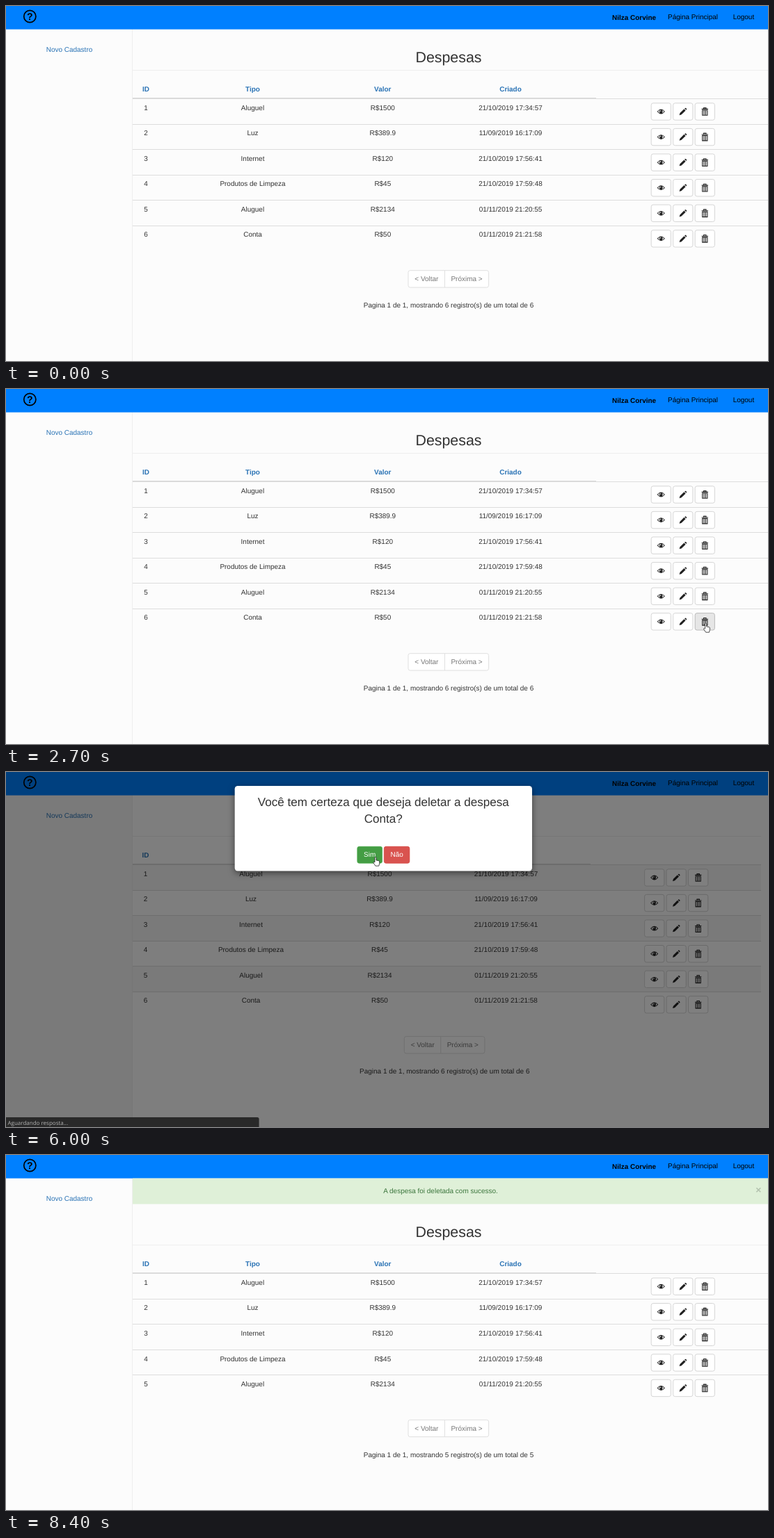
An HTML page for the animation above (8700 ms loop, 1095x511 px).

```html
<!DOCTYPE html>
<html lang="pt-BR">
<head>
<meta charset="utf-8">
<title>Despesas</title>
<style>
  html, body { margin: 0; width: 100%; height: 100%; overflow: hidden; background: #fcfcfc; }
  svg { display: block; }
  text { font: 9.98px "Liberation Sans", Arial, sans-serif; fill: #333; text-rendering: geometricPrecision; }
  .mid { text-anchor: middle; }
  .bold { font-weight: bold; }
  .link { fill: #2a73b5; }
  .nav { fill: #000; }
  .title { font-size: 21.4px; }
  .ask { font-size: 17.1px; }
  .white { fill: #fff; }
  .muted { fill: #777; }
  .ok { fill: #3c763d; }
  .close { font-size: 14px; font-weight: bold; fill: #b3c2ae; }
  .help { font-size: 14px; font-weight: bold; fill: #000; }
  .status { font: 8px "Open Sans", "Noto Sans", sans-serif; fill: #b4b4b4; }
  .btn { fill: #fff; stroke: #ccc; stroke-width: .8; }
  .btn.hover { fill: #e6e6e6; stroke: #adadad; }
  .btn.focus { fill: #e6e6e6; stroke: #3d8bf0; stroke-width: 1.6; }
</style>
</head>
<body>
<svg id="stage" width="1095" height="511" viewBox="0 0 1095 511"></svg>
<script>
const LOOP = 8700, STEP = 100, ROW = 36.57;

const expenses = [
  ["Aluguel", "R$1500", "21/10/2019 17:34:57"],
  ["Luz", "R$389.9", "11/09/2019 16:17:09"],
  ["Internet", "R$120", "21/10/2019 17:56:41"],
  ["Produtos de Limpeza", "R$45", "21/10/2019 17:59:48"],
  ["Aluguel", "R$2134", "01/11/2019 21:20:55"],
  ["Conta", "R$50", "01/11/2019 21:21:58"]
];

// Column centres, first button, header rule end, right edge and pager shift
const wide = { cols: [201, 354.5, 541.3, 725], buttons: 927.2, rule: 848, right: 1095, pager: 0 };
const narrow = { cols: [200.5, 352, 537, 718.5], buttons: 917.6, rule: 840, right: 1085, pager: -5.7 };

const text = (x, y, s, cls = "mid") => `<text x="${x}" y="${y}" class="${cls}">${s}</text>`;
const rect = (x, y, w, h, fill, extra = "") =>
  `<rect x="${x}" y="${y}" width="${w}" height="${h}" fill="${fill}" ${extra}/>`;
const group = (id, body) => `<g id="${id}">${body}</g>`;

const icons = [
  `<path d="M-5.6 0Q0-6.8 5.6 0Q0 6.8-5.6 0Z" fill="#222"/><path d="M-4.2 0Q-3.2-1.7-1.8-2.2Q-3 0-1.6 2.2Q-3.2 1.6-4.2 0ZM4.2 0Q3.2-1.7 1.8-2.2Q3 0 1.6 2.2Q3.2 1.6 4.2 0Z" fill="#fff"/><circle cx="-.7" cy="-1" r=".8" fill="#fff"/>`,
  `<path d="M-5.2 5.2L-4.3 2.1L1.6-3.7L3.8-1.5L-2.1 4.3ZM2.3-4.4L3.1-5.1Q3.8-5.5 4.4-4.9L5.1-4.2Q5.6-3.6 5.1-2.9L4.5-2.2Z" fill="#222"/>`,
  `<path d="M-4.6-3.6H4.6M-1.7-4V-5.4H1.7V-4M-3.6-2V5.3H3.6V-2ZM-1.2-1.8V5M1.2-1.8V5" fill="none" stroke="#222" stroke-width="1.1"/>`
];

const button = (x, y, icon) =>
  `<rect class="btn" x="${x}" y="${y - 12.2}" width="28.2" height="24.4" rx="2.8"/>` +
  `<g transform="translate(${x + 14.1} ${y})">${icon}</g>`;

function tableRow(cells, i, dy, lay, striped) {
  const top = 133 + dy + i * ROW, line = Math.round(top);
  return (striped && i % 2 === 0 ? rect(182, line, lay.right - 182, 37, "#f5f5f5") : "") +
    rect(182, line, lay.right - 182, 1, "#ddd") +
    [i + 1, ...cells].map((s, c) => text(lay.cols[c], top + 16.6, s)).join("") +
    icons.map((icon, b) => button(lay.buttons + b * 31.5, top + 19, icon)).join("");
}

function page(id, lay, count, { dy = 0, dim = false } = {}) {
  const mid = 636 + lay.pager, py = dy ? .6 : 0, x = 578 + lay.pager;
  const heads = ["ID", "Tipo", "Valor", "Criado"];
  return group(id,
    (dim ? rect(0, 33, 182, 478, "#f5f5f5") + rect(182, 33, 913, 478, "#fefefe") : "") +
    rect(181, 33, 1, 478, "#eee") +
    rect(0, 0, 1095, 33.6, "#0080ff") +
    `<circle cx="34.3" cy="15" r="8.6" fill="none" stroke="#000" stroke-width="1.7"/>` +
    text(34.3, 20, "?", "mid help") +
    text(871, 20, "Nilza Corvine", "nav bold") +
    text(951, 19, "Página Principal", "nav") +
    text(1044.7, 19, "Logout", "nav") +
    text(91, 65.6, "Novo Cadastro", "mid link") +
    (dy ? rect(182, 33.6, 913, 37, "#dff0d8") +
      text(624.5, 55.3, "A despesa foi deletada com sucesso.", "mid ok") +
      text(1081.3, 55, "×", "mid close") : "") +
    text(mid, 81 + dy, "Despesas", "mid title") +
    rect(182, 92 + dy, lay.right - 182, 1, "#eee") +
    heads.map((s, c) => text(lay.cols[c], 122.6 + dy, s, "mid bold link")).join("") +
    expenses.slice(0, count).map((e, i) => tableRow(e, i, dy, lay, dim)).join("") +
    rect(182, 132 + dy, lay.rule - 182, 1.4, "#d8d8d8") +
    rect(x, 380.7 + py, 115.6, 24.4, "#fff", `rx="2.8" stroke="#ddd" stroke-width=".9"`) +
    rect(x + 52, 381 + py, .9, 24, "#ddd") +
    text(x + 26.4, 396.4 + py, "&lt; Voltar", "mid muted") +
    text(x + 84, 396.4 + py, "Próxima &gt;", "mid muted") +
    text(mid, 434 + py, `Pagina 1 de 1, mostrando ${count} registro(s) de um total de ${count}`));
}

const dialog = group("dialog",
  rect(0, 0, 1095, 511, "#000", `opacity=".5"`) +
  rect(328.7, 20, 427.3, 122.4, "#fff", `rx="4.3" style="filter:drop-shadow(0 3.5px 5px rgba(0,0,0,.5))"`) +
  text(542.3, 48.5, "Você tem certeza que deseja deletar a despesa", "mid ask") +
  text(542.3, 72.5, "Conta?", "mid ask") +
  rect(504.8, 107.3, 35.8, 24, "#5cb85c", `id="yes" rx="2.8" stroke="#4cae4c" stroke-width=".7"`) +
  rect(543.3, 107.3, 36.6, 24, "#d9534f", `rx="2.8" stroke="#d43f3a" stroke-width=".7"`) +
  text(522.7, 122.4, "Sim", "mid white") +
  text(561.6, 122.4, "Não", "mid white"));

const status = group("status",
  `<path d="M0 511V497H361Q363.6 497 363.6 499.6V511Z" fill="#292929"/>` +
  text(2.5, 507.5, "Aguardando resposta...", "status"));

const cursor = group("cursor",
  `<path id="arrow" d="M.4.4V9L2.4 7.3L3.8 10.5L5.2 9.9L3.8 6.8H6.4Z" fill="#fff" stroke="#222" stroke-width=".8"/>` +
  `<path id="hand" transform="translate(-3.4 0)" d="M2.6 7.8V1.4a1 1 0 0 1 2 0V5l3.6.7q1.1.3 1.1 1.4v2.5L8.4 13.2H3.5L.5 8.6q-.1-1.3 1-1z" fill="#fff" stroke="#222" stroke-width=".8"/>`);

const $ = id => document.getElementById(id);
$("stage").innerHTML =
  page("list", wide, 6) +
  page("dimmed", narrow, 6, { dim: true }) +
  page("done", wide, 5, { dy: 37.2 }) +
  dialog + status + cursor;

const lastButton = id => [...document.querySelectorAll(`#${id} .btn`)].pop();
const trash = lastButton("list"), focused = lastButton("dimmed");

// Start time, number of steps, destination
const moves = [
  [200, 1, 32, 0], [300, 3, 738, 415], [600, 2, 387, 157],
  [900, 3, 750.5, 263], [1400, 4, 949, 366], [1900, 6, 1005.5, 340],
  [2600, 2, 1005.5, 337], [4300, 1, 963, 312], [4500, 2, 594, 163],
  [4800, 5, 530.8, 122], [7500, 4, 210, 58], [8000, 2, 674, 280], [8200, 2, 80, 0]
];

function cursorAt(t) {
  let x = 0, y = 0;
  for (const [start, steps, toX, toY] of moves) {
    if (t < start) break;
    const p = Math.min(1, ((t - start) / STEP + 1) / steps);
    x += (toX - x) * p;
    y += (toY - y) * p;
  }
  return [x, y];
}

const within = (t, from, to) => t >= from && t < to;
const show = (id, on) => { $(id).style.display = on ? "" : "none"; };

function render(now) {
  const t = Math.floor((now % LOOP) / STEP) * STEP;
  const modal = within(t, 4000, 6500);
  const pointing = within(t, 2300, 4000) || within(t, 5100, 7500);

  show("list", t < 4000);
  show("dimmed", modal);
  show("dialog", modal);
  show("done", t >= 6500);
  trash.classList.toggle("hover", t >= 2300);
  focused.classList.toggle("focus", t < 5500);
  $("yes").setAttribute("fill", t >= 5100 ? "#449d44" : "#5cb85c");

  show("status", within(t, 5600, 6900));
  $("status").style.opacity = t < 6000 ? .9 : t < 6800 ? 1 : .5;

  show("cursor", within(t, 200, 8400));
  show("arrow", !pointing);
  show("hand", pointing);
  $("cursor").setAttribute("transform", `translate(${cursorAt(t)})`);
}

const begin = performance.now();
function tick() {
  render(performance.now() - begin);
  requestAnimationFrame(tick);
}
tick();
</script>
</body>
</html>
```
